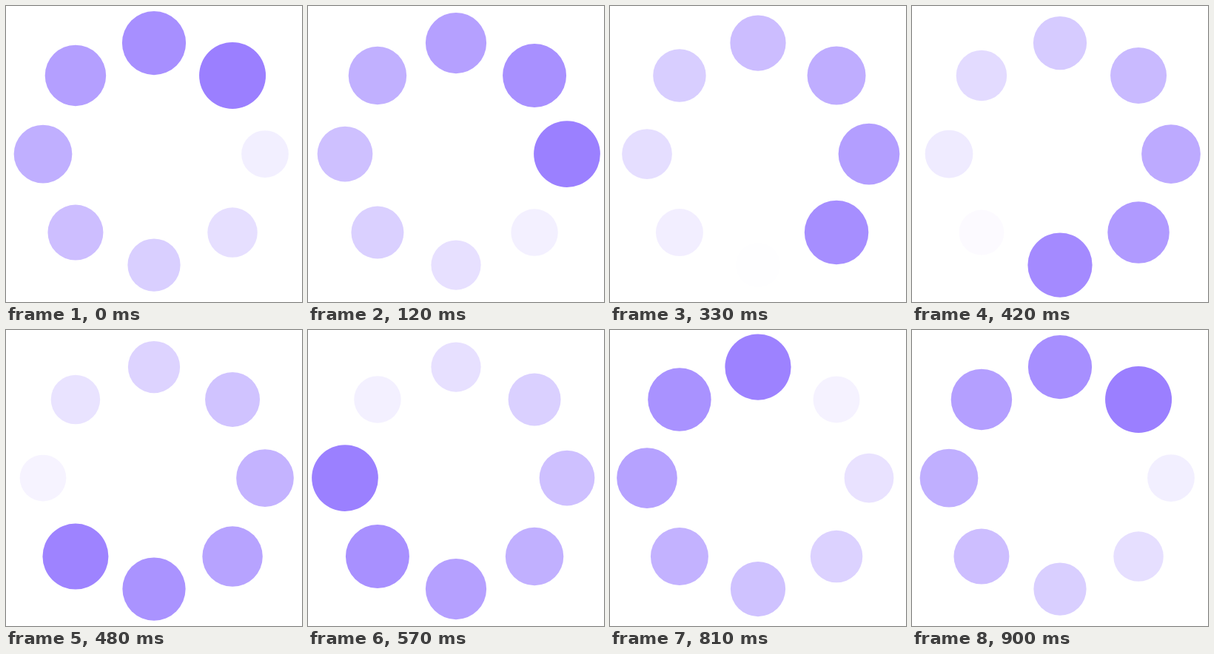
An HTML page that plays this animation: 400x400 px, repeating every 930 ms.

```html
<!DOCTYPE html>
<html lang="en">
<head>
<meta charset="utf-8">
<title>Spinner</title>
<style>
  html, body { margin: 0; width: 100%; height: 100%; overflow: hidden; background: #fff; }
  svg { display: block; width: 100%; height: 100%; }
</style>
</head>
<body>
<svg viewBox="0 0 400 400" fill="#9b7fff"></svg>
<script>
  const COUNT = 8, RING = 150, STEP = 30, TICKS = 30;
  const svg = document.querySelector('svg');

  const dots = Array.from({ length: COUNT }, (_, i) => {
    const dot = document.createElementNS(svg.namespaceURI, 'circle');
    const angle = (i - 1) * 2 * Math.PI / COUNT;
    dot.setAttribute('cx', 200 + RING * Math.cos(angle));
    dot.setAttribute('cy', 200 + RING * Math.sin(angle));
    return svg.appendChild(dot);
  });

  // One turn takes TICKS steps; the closing pose is held for one more step.
  function draw(ms) {
    const tick = Math.floor(ms / STEP) % (TICKS + 1);
    const turn = TICKS * COUNT;
    dots.forEach((dot, i) => {
      const age = (tick * COUNT - i * TICKS + turn) % turn / turn;
      dot.setAttribute('r', 45 - 15 * age);
      dot.setAttribute('fill-opacity', 1 - age);
    });
  }

  function loop() {
    draw(performance.now());
    requestAnimationFrame(loop);
  }
  loop();
</script>
</body>
</html>
```
